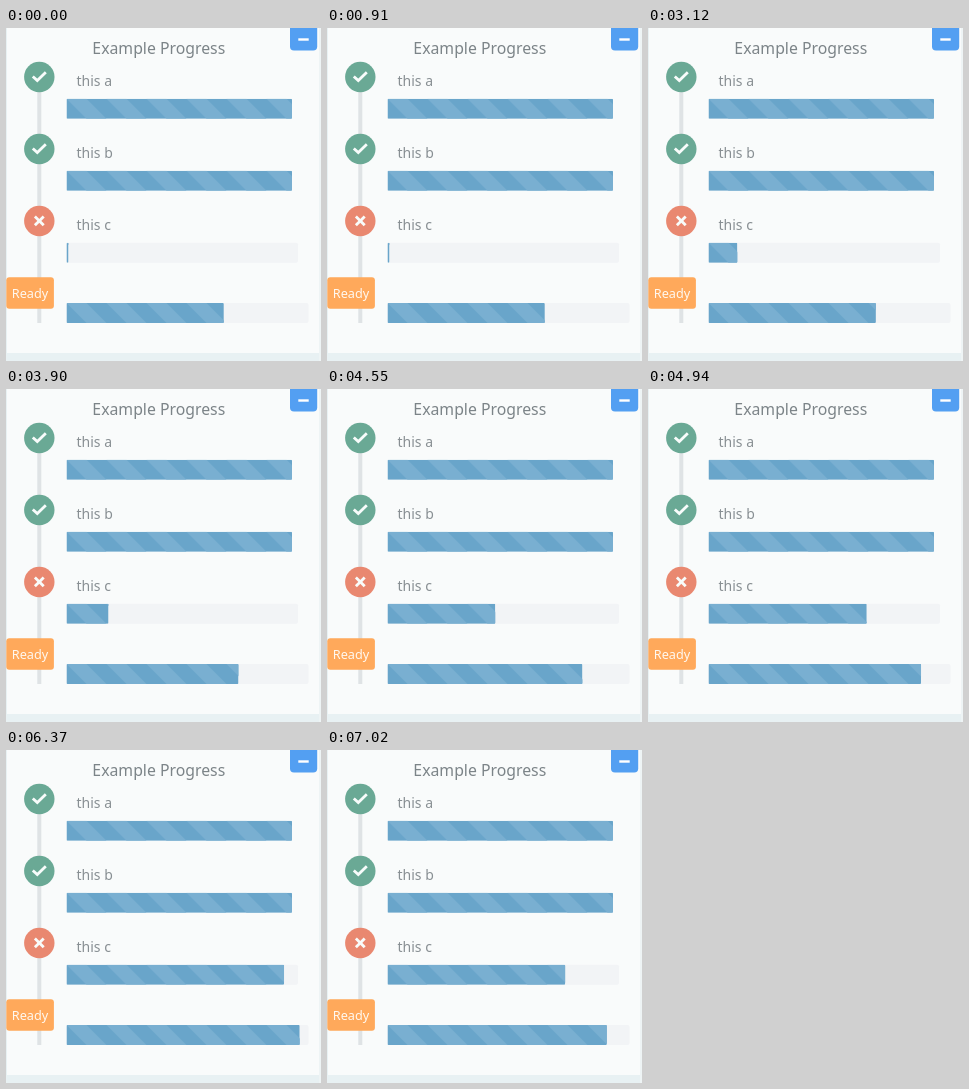
Recreate the animation shown at these times as an HTML page with a canvas. Size 315 by 333 pixels, loop 7150 ms.

```html
<!DOCTYPE html>
<html lang="en">
<head>
<meta charset="utf-8">
<title>Example Progress</title>
<style>
  html, body { margin: 0; width: 100%; height: 100%; overflow: hidden; background: #f9fbfb; }
  canvas { display: block; }
</style>
</head>
<body>
<canvas id="stage"></canvas>
<script>
const W = 315, H = 333, LOOP = 7150, TICK = 130;
const FONT = '"Noto Sans", "Open Sans", sans-serif';
const GREEN = '#6aa995', RED = '#e98870', ORANGE = '#ffa95b', BLUE = '#539ff2';
const BAR_X = 60.5, BAR_H = 20;

// Completion of the third task: [time, fraction]
const KEYS = [
  [0, 0], [1170, 0], [1820, 0.128], [3770, 0.128],
  [4550, 0.478], [5460, 1], [6240, 1], [7020, 0.788], [LOOP, 0.788]
];

const canvas = document.getElementById('stage');
const ctx = canvas.getContext('2d');
const dpr = window.devicePixelRatio || 1;
canvas.width = W * dpr;
canvas.height = H * dpr;
canvas.style.width = W + 'px';
canvas.style.height = H + 'px';

function progressAt(t) {
  const i = KEYS.findIndex(k => k[0] > t);
  const [t0, v0] = KEYS[i - 1], [t1, v1] = KEYS[i];
  return v0 + (v1 - v0) * (t - t0) / (t1 - t0);
}

function rect(x, y, w, h, color) {
  ctx.fillStyle = color;
  ctx.fillRect(x, y, w, h);
}

function roundBox(x, y, w, h, r, color) {
  ctx.fillStyle = color;
  ctx.beginPath();
  ctx.roundRect(x, y, w, h, r);
  ctx.fill();
}

function text(str, x, y, size, color, align = 'left', weight = 500) {
  ctx.font = `${weight} ${size}px ${FONT}`;
  ctx.textAlign = align;
  ctx.fillStyle = color;
  ctx.fillText(str, x, y);
}

function stroke(points, width) {
  ctx.strokeStyle = '#f8fcfb';
  ctx.lineWidth = width;
  ctx.beginPath();
  for (const [x, y] of points) ctx.lineTo(x, y);
  ctx.stroke();
}

function bar(y, width, track) {
  if (track > width) roundBox(BAR_X, y, track, BAR_H, 2, '#f2f4f6');
  ctx.save();
  ctx.beginPath();
  ctx.roundRect(BAR_X, y, width, BAR_H, Math.min(1, width / 2));
  ctx.clip();
  rect(BAR_X, y, width, BAR_H, '#69a5ca');
  ctx.fillStyle = '#79afd1';
  for (let x = BAR_X - 40; x < BAR_X + width; x += 40) {
    ctx.beginPath();
    ctx.moveTo(x, y);
    ctx.lineTo(x + 20, y);
    ctx.lineTo(x + 20 + BAR_H, y + BAR_H);
    ctx.lineTo(x + BAR_H, y + BAR_H);
    ctx.fill();
  }
  ctx.restore();
}

function badge(y, done) {
  const x = 33.3;
  ctx.fillStyle = done ? GREEN : RED;
  ctx.beginPath();
  ctx.arc(x, y, 15.2, 0, Math.PI * 2);
  ctx.fill();
  if (done) {
    stroke([[x - 6.5, y - 0.6], [x - 2, y + 3.6], [x + 6.5, y - 4.7]], 2.8);
  } else {
    stroke([[x - 4.4, y - 4.6], [x + 4.4, y + 4.2]], 2.8);
    stroke([[x + 4.4, y - 4.6], [x - 4.4, y + 4.2]], 2.8);
  }
}

function task(name, y, value) {
  const done = value >= 1;
  badge(y, done);
  text(name, 70.5, y + 8.8, 14, '#888f93');
  bar(y + 21.8, Math.max(2, 225.5 * value), done ? 0 : 231.5);
}

function draw(t) {
  const c = progressAt(t), done = c >= 1;
  ctx.setTransform(dpr, 0, 0, dpr, 0, 0);
  rect(0, 0, W, H, '#f9fbfb');
  rect(0, 325, W, 8, '#e8f1f3');
  rect(0, 0, 1, H, '#e8f1f3');
  rect(313, 0, 2, H, '#eef4f5');

  text('Example Progress', 152.8, 25.6, 15.8, '#7c8488', 'center');
  roundBox(284, -4, 27.2, 26.6, 4, BLUE);
  rect(292.3, 10.3, 10.4, 2.4, '#fff');

  rect(31.3, 34, 4, 261, '#dfe3e5');
  task('this a', 49, 1);
  task('this b', 121, 1);
  task('this c', 193, c);

  roundBox(0.3, 249.3, 47.6, 31.4, 3, done ? GREEN : ORANGE);
  text('Ready', 24, 270, 12.7, '#fff8f0', 'center');
  bar(275, 236 * (2 + c) / 3, done ? 0 : 242);
}

const start = performance.now();
function frame() {
  const t = (performance.now() - start) % LOOP;
  draw(Math.floor(t / TICK) * TICK);
  requestAnimationFrame(frame);
}
frame();
</script>
</body>
</html>
```
